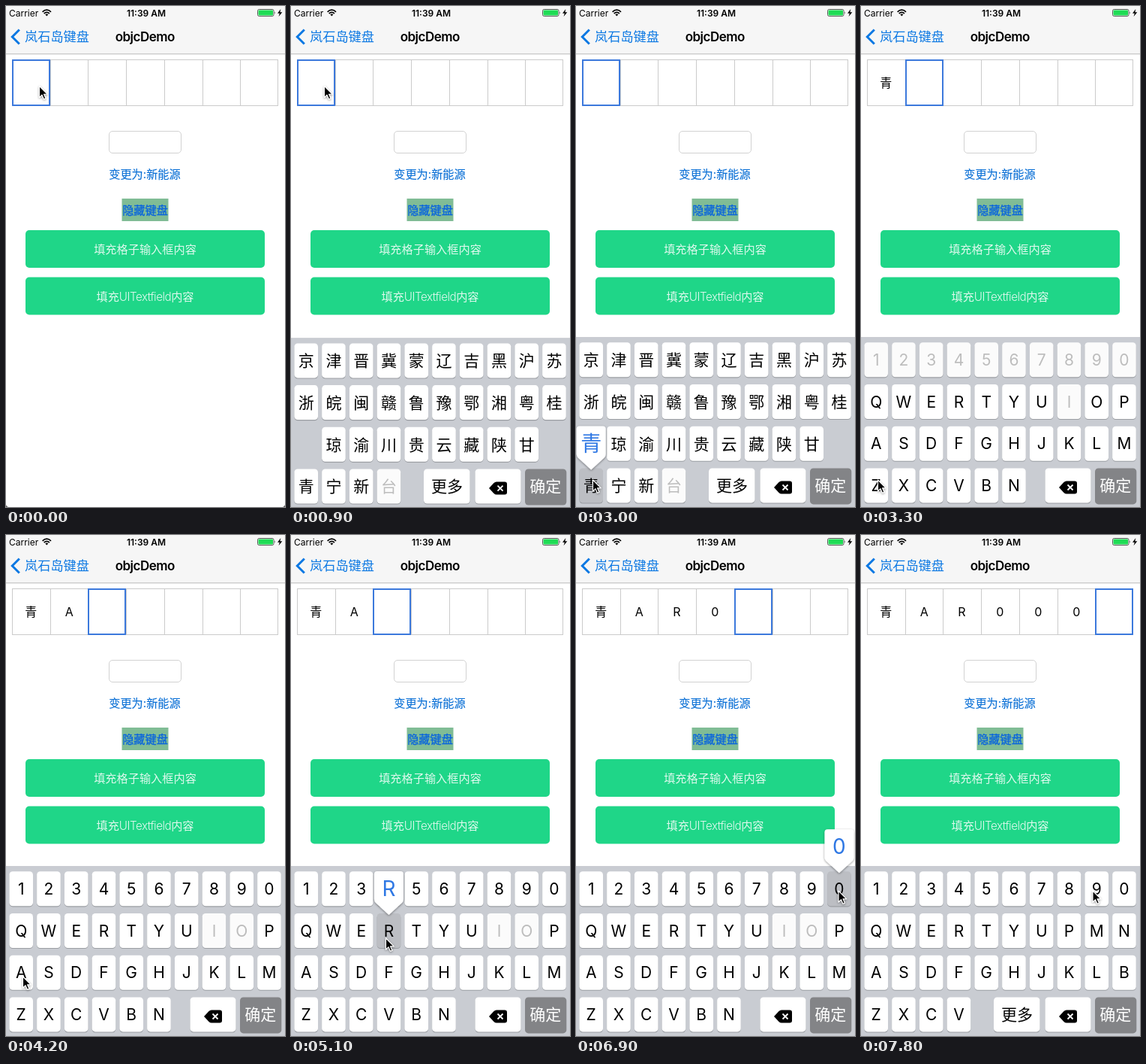
Recreate the animation shown at these times as an HTML page. Size 372 px wide and 666 px high, loop 8000 ms.

```html
<!DOCTYPE html>
<html lang="zh-CN">
<head>
<meta charset="utf-8">
<title>objcDemo</title>
<style>
  html, body { margin: 0; width: 100%; height: 100%; overflow: hidden; background: #fff; }
  svg { display: block; width: 372px; height: 666px; }
  text { font-family: Inter, "Noto Sans CJK SC", "Noto Sans CJK", sans-serif; }
</style>
</head>
<body>
<svg id="stage" viewBox="0 0 372 666" xmlns="http://www.w3.org/2000/svg">
  <defs>
    <filter id="soft" x="-30%" y="-30%" width="160%" height="160%">
      <feDropShadow dx="0" dy="1" stdDeviation="1.6" flood-opacity=".45"/>
    </filter>
  </defs>
  <rect width="372" height="666" fill="#fff"/>
  <path d="M0 663V666H3Q0.5 665.5 0 663ZM372 663V666H369Q371.500 665.500 372 663Z" fill="#555"/>

  <rect width="372" height="63.500" fill="#f6f6f6"/>
  <rect y="63.300" width="372" height="1" fill="#b9b9b9"/>
  <text x="4" y="13.500" font-size="12">Carrier</text>
  <g fill="none" stroke="#000" stroke-width="1.700">
    <path d="M48.600 7.800Q54.300 2.600 60 7.800M50.700 10Q54.300 6.700 57.900 10"/>
    <path d="M52.300 11.300Q54.300 9.600 56.300 11.300L54.300 13.500Z" fill="#000" stroke="none"/>
  </g>
  <text x="187" y="13.500" font-size="12" font-weight="600" text-anchor="middle">11:39 AM</text>
  <rect x="335.500" y="4.500" width="21.500" height="9" rx="2" fill="#fff" stroke="#333" stroke-width=".8"/>
  <rect x="336.500" y="5.500" width="19.500" height="7" rx="1" fill="#1fdc55"/>
  <path d="M358 7.500Q359.500 9 358 10.500Z" fill="#333"/>
  <path d="M366.300 4L362 9.800H364.800L363.600 14L368.300 8.200H365.400Z"/>
  <path d="M17.800 31.500L8.300 41L17.800 50.500" fill="none" stroke="#0b78e3" stroke-width="3"/>
  <text x="25" y="47.300" font-size="17.200" fill="#0b78e3">岚石岛键盘</text>
  <text x="185.300" y="47" font-size="17" font-weight="600" letter-spacing="-.5" text-anchor="middle">objcDemo</text>

  <g id="cells"></g>

  <rect x="137.500" y="166.500" width="96" height="29" rx="4.500" fill="#fff" stroke="#d2d2d2"/>
  <g font-size="15.200" text-anchor="middle">
    <text x="185" y="228.600" fill="#0b70d6" stroke="#0b70d6" stroke-width=".15">变更为:新能源</text>
    <rect x="154.500" y="256" width="62" height="30" fill="#80bc95"/>
    <text x="185.500" y="276.800" fill="#0b66dc" stroke="#0b66dc" stroke-width=".35">隐藏键盘</text>
    <g fill="#1fd688">
      <rect x="26" y="298" width="319" height="50" rx="5"/>
      <rect x="26" y="360.500" width="319" height="50" rx="5"/>
    </g>
    <g fill="#fff" fill-opacity=".86" font-weight="300">
      <text x="185.500" y="329">填充格子输入框内容</text>
      <text x="185.500" y="391.500">填充<tspan letter-spacing="-.5">UITextfield</tspan>内容</text>
    </g>
  </g>

  <g id="keyboard"></g>
  <g id="cursor">
    <path d="M0 0V15L3.500 11.700L6 17.300L8.400 16.300L6 10.800H10.700Z"
      fill="#000" stroke="#fff" stroke-width="1.100" stroke-linejoin="round" filter="url(#soft)"/>
  </g>
</svg>
<script>
const LOOP = 8000, STEP = 300, KEYBOARD_START = 490;
const KEY = { x: 4.4, y: 447.3, w: 31.6, h: 46, dx: 36.75, dy: 55.7 };
const BLUE = '#2f78e4';

const CITIES = ['京津晋冀蒙辽吉黑沪苏', '浙皖闽赣鲁豫鄂湘粤桂', ' 琼渝川贵云藏陕甘', '青宁新台'];
const LETTERS = ['1234567890', 'QWERTYUIOP', 'ASDFGHJKLM', 'ZXCVBN'];
const ENDING = ['1234567890', 'QWERTYUPMN', 'ASDFGHJKLB', 'ZXCV'];

// Each press lasts from down to up; its character is entered on release.
const PRESSES = [
  { char: '青', down: 3000, up: 3300 },
  { char: 'A', down: 3900, up: 4200 },
  { char: 'R', down: 5100, up: 5400 },
  { char: '0', down: 6600, up: 6900 },
  { char: '0', down: 6900, up: 7200 },
  { char: '0', down: 7200, up: 7500 }
];

// time, x, y of the pointer tip
const PATH = [
  [0, 44.500, 106.500], [900, 44.500, 106.500], [2400, 22.500, 630], [3300, 22.500, 630],
  [3900, 22.500, 587], [4200, 22.500, 587], [5100, 126.500, 536], [5400, 126.500, 536],
  [6300, 350, 473], [7500, 350, 473], [7800, 309, 473], [LOOP, 309, 473]
];

const byId = id => document.getElementById(id);
const isLatin = s => s.charCodeAt(0) < 128;

function label(s, cx, cy, size, fill = '#000') {
  const y = cy + size * (isLatin(s) ? 0.364 : 0.38);
  return `<text x="${cx}" y="${y}" font-size="${size}" fill="${fill}" text-anchor="middle">${s}</text>`;
}

function box(x, y, w, h, fill, rx = 0) {
  return `<rect x="${x}" y="${y}" width="${w}" height="${h}" rx="${rx}" fill="${fill}"/>`;
}

function keycap(x, y, w, fill = '#fff') {
  return box(x, y + 1.1, w, KEY.h, '#9b9ea3', 4.5) + box(x, y, w, KEY.h, fill, 4.5);
}

function balloon(cx, y, char) {
  const l = cx - 19.5, r = cx + 19.5, top = y - 56;
  const shape = `M${l + 4} ${top}H${r - 4}Q${r} ${top} ${r} ${top + 4}V${top + 37}` +
    `Q${r} ${top + 40} ${r - 2} ${top + 42}L${cx} ${y + 2}L${l + 2} ${top + 42}` +
    `Q${l} ${top + 40} ${l} ${top + 37}V${top + 4}Q${l} ${top} ${l + 4} ${top}Z`;
  return `<path d="${shape}" fill="#fff" filter="url(#soft)"/>` + label(char, cx, top + 23, 28, BLUE);
}

function deleteKey(y) {
  return keycap(245.5, y, 61) +
    `<path d="M264 640L270.500 633Q272 631.500 274 631.500H285Q288 631.500 288 634.500V645.500` +
    `Q288 648.500 285 648.500H274Q272 648.500 270.500 647Z"/>` +
    `<path d="M275.500 636.500L282.500 643.500M282.500 636.500L275.500 643.500" stroke="#fff" stroke-width="1.800"/>`;
}

const cellX = i => Math.round(8 + 50.7 * i);

function cells(typed) {
  let out = '<rect x="8.500" y="71.500" width="354" height="61" fill="#fff" stroke="#cbcbcb"/>';
  for (let i = 1; i < 7; i++) out += box(cellX(i), 72, 1, 60, '#cbcbcb');
  typed.forEach((c, i) => { out += label(c, cellX(i) + 25.3, 102.3, 16); });
  return out + `<rect x="${cellX(typed.length) + 1}" y="72" width="49" height="60" fill="none" stroke="#3c79dc" stroke-width="2"/>`;
}

function keyboard(count, pressed) {
  const rows = count === 0 ? CITIES : count < 6 ? LETTERS : ENDING;
  const disabled = count === 0 ? '台' : count === 1 ? '1234567890I' : count < 6 ? 'IO' : '';
  const lastY = KEY.y + 3 * KEY.dy;
  let out = box(0, 440, 372, 228, '#c9ccd2'), popup = '';
  rows.forEach((row, r) => [...row].forEach((char, i) => {
    if (char === ' ') return;
    const x = KEY.x + i * KEY.dx, y = KEY.y + r * KEY.dy, cx = x + KEY.w / 2;
    const down = char === pressed, off = disabled.includes(char);
    out += keycap(x, y, KEY.w, down ? '#bcbec3' : off ? '#fbfbfb' : '#fff');
    out += label(char, cx, y + 23, 21, off ? '#bdbdbd' : '#000');
    if (down) popup = balloon(cx, y, char);
  }));
  if (rows !== LETTERS) out += keycap(177, lastY, 61.5) + label('更多', 208, lastY + 23, 21);
  out += deleteKey(lastY);
  out += box(312, lastY, 55.3, 48, '#838487', 4.5) + label('确定', 339.3, lastY + 23, 21, '#fff');
  return out + popup;
}

// Critically damped rise from below the stage.
function keyboardOffset(t) {
  const k = Math.max(0, t - KEYBOARD_START) * 0.01826;
  return 228 * (1 + k) * Math.exp(-k);
}

function pointer(t) {
  const i = PATH.findIndex(p => p[0] > t);
  const [t0, x0, y0] = PATH[i - 1], [t1, x1, y1] = PATH[i];
  const u = (t - t0) / (t1 - t0), e = u * u * (3 - 2 * u);
  return [x0 + (x1 - x0) * e, y0 + (y1 - y0) * e];
}

function draw(t) {
  const typed = PRESSES.filter(p => t >= p.up).map(p => p.char);
  const press = PRESSES.find(p => t >= p.down && t < p.up);
  const [x, y] = pointer(t);
  byId('cells').innerHTML = cells(typed);
  byId('keyboard').innerHTML = keyboard(typed.length, press && press.char);
  byId('keyboard').setAttribute('transform', `translate(0 ${keyboardOffset(t).toFixed(1)})`);
  byId('cursor').setAttribute('transform', `translate(${x.toFixed(1)} ${y.toFixed(1)})`);
}

// The screen refreshes in hard steps.
let shown = -1;
const start = performance.now();
function tick() {
  const t = Math.floor(((performance.now() - start) % LOOP) / STEP) * STEP;
  if (t !== shown) draw(shown = t);
  requestAnimationFrame(tick);
}
tick();
</script>
</body>
</html>
```
